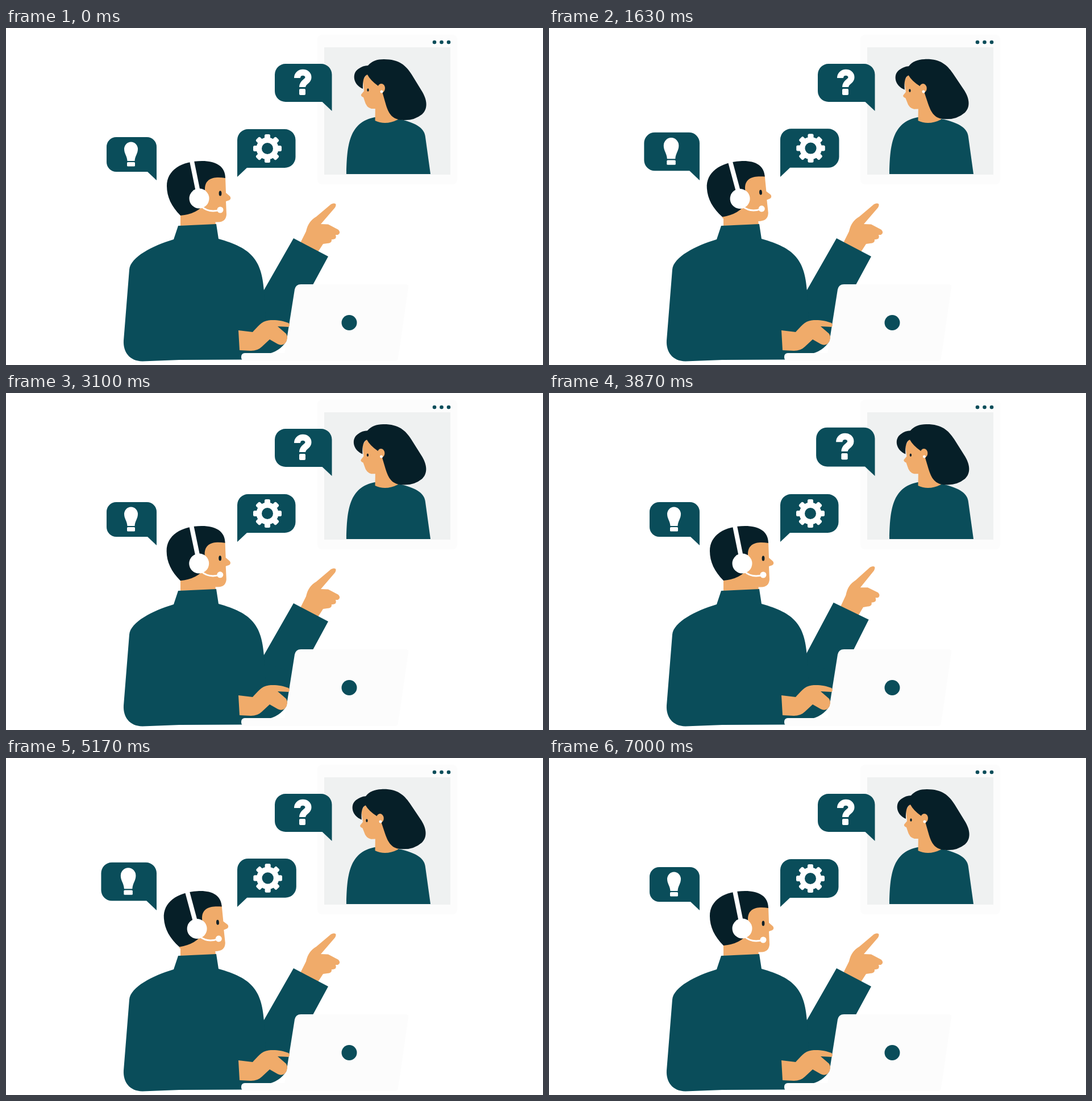
These frames come from a looping animation (945x593 px, 7030 ms). An HTML page with a canvas:

```html
<!DOCTYPE html>
<html lang="en">
<head>
<meta charset="utf-8">
<title>Support call</title>
<style>
html, body { margin: 0; width: 100%; height: 100%; overflow: hidden; background: #fff; }
canvas { display: block; width: 945px; height: 593px; }
</style>
</head>
<body>
<canvas id="stage"></canvas>
<script>
const W = 945, H = 593, LOOP = 7030, HALF = LOOP / 2;
const TEAL = '#0a4d5a', DARK = '#061f28', SKIN = '#f0ab6a', WHITE = '#fff', PALE = '#fcfcfc';
const canvas = document.getElementById('stage');
const ctx = canvas.getContext('2d');
const dpr = window.devicePixelRatio || 1;
canvas.width = W * dpr;
canvas.height = H * dpr;

const path = d => new Path2D(d);
const fill = (shape, color) => { ctx.fillStyle = color; ctx.fill(shape); };

function stroke(shape, width, color, cap = 'butt') {
  ctx.lineWidth = width;
  ctx.strokeStyle = color;
  ctx.lineCap = cap;
  ctx.stroke(shape);
}

function oval(x, y, rx, color, ry = rx) {
  ctx.beginPath();
  ctx.ellipse(x, y, rx, ry, 0, 0, Math.PI * 2);
  ctx.fillStyle = color;
  ctx.fill();
}

function box(x, y, w, h, r, color) {
  ctx.beginPath();
  ctx.roundRect(x, y, w, h, r);
  ctx.fillStyle = color;
  ctx.fill();
}

// Draws around a pivot with rotation in degrees and uniform scale.
function pose(x, y, angle, scale, draw) {
  ctx.save();
  ctx.translate(x, y);
  ctx.rotate(angle * Math.PI / 180);
  ctx.scale(scale, scale);
  ctx.translate(-x, -y);
  draw();
  ctx.restore();
}

const ease = (t, from, to) => {
  const u = Math.min(1, Math.max(0, (t - from) / (to - from)));
  return (1 - Math.cos(Math.PI * u)) / 2;
};
const pulse = (t, start) => ease(t, start, start + 750) - ease(t, start + 750, start + 1500);

const man = {
  torso: path('M303 348L370 345L374 371C432 387 450 408 454 462L460 573L415 583.5L305 584L240 586.5C217 586 206 570 207 550L217 425C219 403 258 383 295 372Z'),
  neck: path('M307 322L366 322L369 346L307 348Z'),
  face: path('M318 262L386 262L387 290L394 296Q397 300 393 303L387 305L388 328Q387 341 374 341.5L330 342L307 332Z'),
  hair: path('M307 330C291 314 283 297 283 278C283 250 309 234 345 234C369 234 386 243 386 264C366 261 350 264 350 284L350 308Q338 327 307 330Z'),
  band: path('M327 234L338 288'),
  mic: path('M344 314Q357 326 377 320'),
  arm: path('M506 370L567 402L541 450L497 531L420 520L454 461Z'),
  point: path('M516 382L528 358C531 345 536 338 546 332L572 310Q578 307 580.5 310Q581 313 579 316L554 345L567 345.5L585 355Q590 361 584 364L580 364Q583 371 575 372L573 372Q574 379 565 379L558 380L549 394Z'),
  elbow: path('M440 470L500 490L497 545Q486 567 463 573L415 573Z'),
  typing: path('M409 532L434 535C443 526 449 516 462 514.5C473 513 487 515 497 519Q501 523 497 526L478 525L493 538Q498 546 491 555Q485 560 478 556L464 548L450 561Q443 568 431 568L411 567Z')
};

const woman = {
  torso: path('M599 257C600 205 604 166 649 157L690 160C726 167 737 179 738 192L747 257Z'),
  neck: path('M650 132L690 132L690 161Q668 172 649.5 163Z'),
  face: path('M636 79L628 92L630 111L625 117Q624 120 629 122L631 128Q634 140 643 142L668 142L672 95Z'),
  hair: path('M628 107C611 100 608 80 620 72Q628 66 637 66C644 58 653 55 665 55C692 55 704 66 714 82L733 113C742 129 742 143 732 152Q718 163 700 162C679 162 673 150 668 133L662 112L655 102Q641 92 636 82Q627 85 628 107Z')
};

const laptop = path('M519 451L703 451Q709 451 708 457L690 581Q689 586 684 586L488 586L508 460Q510 451 519 451Z');
const hook = path('M512.5 88C512.5 75.3 532 75.3 532 87C532 95 521.5 94 521.5 104');
const bulb = path('M208 213A12 12.5 0 0 1 232 213C232 221 227 225 226.5 234L213.5 234C213 225 208 221 208 213Z');

// Speech bubble with its tail tip at (x, y); side is the direction of the body.
function bubble(x, y, side, w, top, gap, r) {
  const far = x + side * w, low = y - gap;
  ctx.beginPath();
  ctx.moveTo(x, y);
  ctx.arcTo(x, top, far, top, r);
  ctx.arcTo(far, top, far, low, r);
  ctx.arcTo(far, low, x, low, r);
  ctx.lineTo(x + side * (gap + 1), low);
  ctx.closePath();
  ctx.fillStyle = TEAL;
  ctx.fill();
}

function gear(x, y) {
  for (let i = 0; i < 8; i++) {
    pose(x, y, i * 45, 1, () => box(x - 5, y - 25, 10, 12, 2.5, WHITE));
  }
  oval(x, y, 19.5, WHITE);
  oval(x, y, 10, TEAL);
}

function drawCall(lean) {
  box(548, 12, 246, 263, 8, PALE);
  box(560, 34, 222, 224, 0, '#eff1f1');
  for (let i = 0; i < 3; i++) oval(754 + i * 12.5, 25, 3.3, TEAL);
  fill(woman.torso, TEAL);
  fill(woman.neck, SKIN);
  pose(661, 157, -2.5 * lean, 1, () => {
    fill(woman.face, SKIN);
    fill(woman.hair, DARK);
    oval(660.5, 106, 6.5, SKIN, 8);
    oval(661, 112, 2.5, WHITE);
    oval(637, 109, 1.7, DARK, 2.8);
  });
}

function drawMan(lean, lift) {
  pose(460, 540, -5.6 * lift, 1, () => {
    fill(man.point, SKIN);
    fill(man.arm, TEAL);
  });
  fill(man.elbow, TEAL);
  fill(man.neck, SKIN);
  pose(345, 362, -3.6 * lean, 1, () => {
    fill(man.face, SKIN);
    fill(man.hair, DARK);
    stroke(man.band, 8, WHITE);
    oval(340, 300, 17.5, WHITE);
    stroke(man.mic, 3, WHITE, 'round');
    oval(377, 320, 5.5, WHITE);
    oval(377, 291, 2.4, DARK, 4.5);
  });
  fill(man.torso, TEAL);
}

function drawLaptop() {
  box(414, 572, 90, 14, [6, 0, 0, 6], PALE);
  fill(laptop, PALE);
  oval(604, 518.5, 13.5, TEAL);
  fill(man.typing, SKIN);
}

function drawBubbles(t) {
  const grow = (start, amount) => 1 + amount * pulse(t, start);
  pose(573.5, 146, 0, grow(70, 0.09), () => {
    bubble(573.5, 146, -1, 100.5, 63, 16, 19);
    stroke(hook, 11, WHITE);
    box(516, 107, 11, 11, 2, WHITE);
  });
  pose(265, 268, 0, grow(850, 0.11), () => {
    bubble(265, 268, -1, 88, 192, 15, 17);
    fill(bulb, WHITE);
    box(213, 236, 14, 7.5, 1.5, WHITE);
  });
  pose(407, 262, 0, grow(1480, 0.1), () => {
    bubble(407, 262, 1, 102.5, 178, 16, 19);
    gear(460, 212);
  });
}

function draw(now) {
  const t = now % LOOP % HALF;
  ctx.setTransform(dpr, 0, 0, dpr, 0, 0);
  ctx.fillStyle = WHITE;
  ctx.fillRect(0, 0, W, H);
  drawCall(ease(t, 100, 800) - ease(t, 2450, 3450));
  drawMan(ease(t, 520, 1370) - ease(t, 2400, 3250), pulse(t, 70));
  drawLaptop();
  drawBubbles(t);
}

const start = performance.now();
function tick() {
  draw(performance.now() - start);
  requestAnimationFrame(tick);
}
tick();
</script>
</body>
</html>
```
